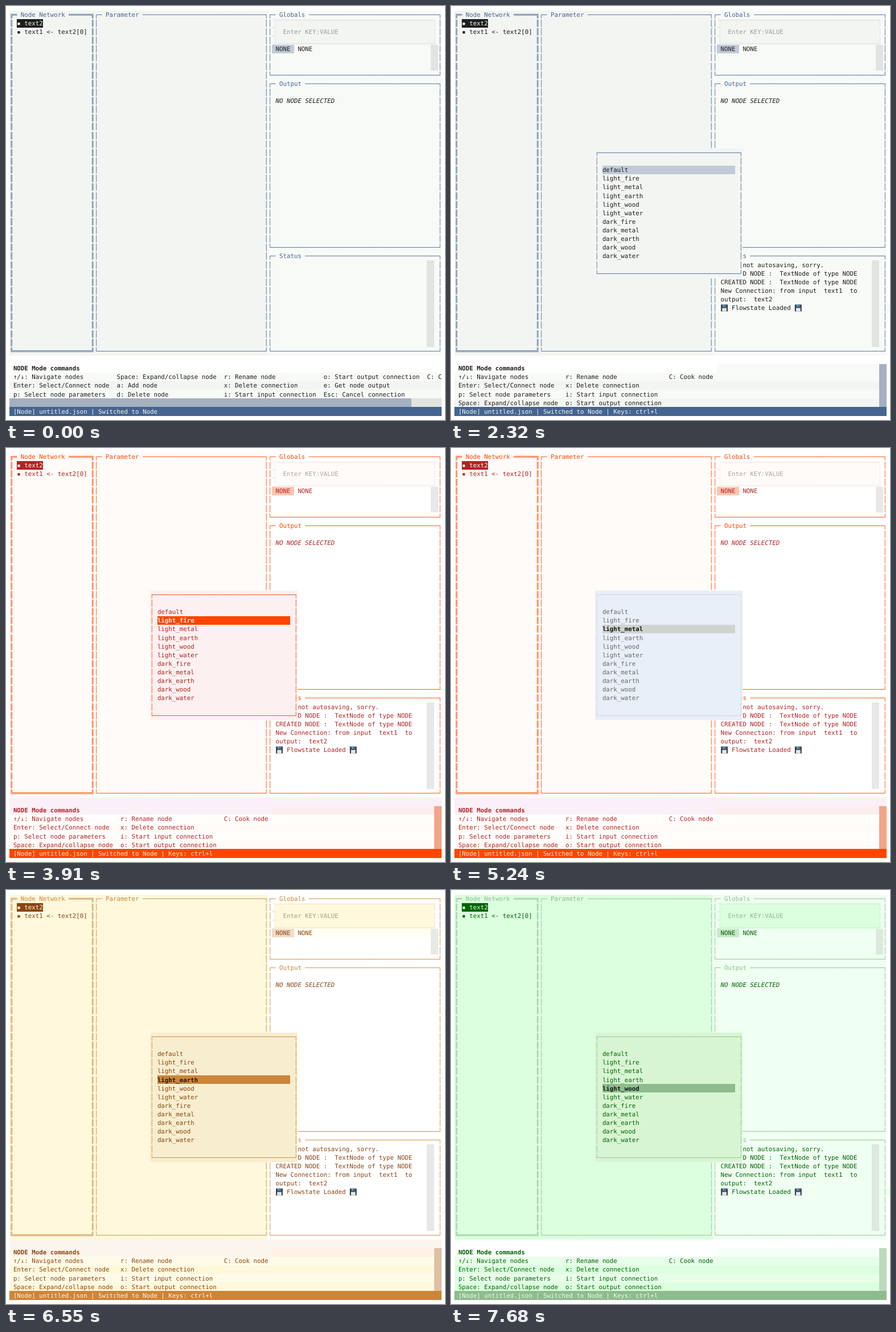
An HTML page with a canvas for the animation above (8000 ms loop, 771x726 px).

```html
<!DOCTYPE html>
<html lang="en">
<head>
<meta charset="utf-8">
<title>Terminal theme picker</title>
<style>
  html, body { margin: 0; width: 100%; height: 100%; overflow: hidden; background: #fff; }
  canvas { display: block; }
</style>
</head>
<body>
<canvas id="screen" width="771" height="726"></canvas>
<script>
const ctx = document.getElementById('screen').getContext('2d');
const LOOP = 8000;
const X0 = 6.4, Y0 = 7.5, CELL_W = 6.487, CELL_H = 15.13, BASELINE = 11.3;
const FONT = '10.776px "DejaVu Sans Mono", monospace';

// line: borders and titles, left/right: panel fills, odd/even: command table stripes
const THEMES = {
  default: { text: '#1e1e1e', line: '#456592', left: '#f3f5f2', right: '#f8faf7', edge: '#e6e8e5',
    hint: '#9a9c99', none: '#c1cad7', globalsRow: '#f8faf7', track: '#e2e4e1', thumb: '#a5b0c0',
    head: '#ffffff', headRight: '#f8faf7', even: '#f8faf7', odd: '#f3f5f2', bar: '#45648f', barText: '#f1f4f7',
    popup: '#f3f5f2', pick: '#45648f', pickText: '#f3f5f2' },
  light_fire: { text: '#b22222', line: '#ff4500', left: '#fffbf8', right: '#ffffff', edge: '#f4efec',
    hint: '#a9a5a2', none: '#ffc5b3', globalsRow: '#ffffff', track: '#e7e9e6', thumb: '#f2a588',
    head: '#fbf0f8', headRight: '#fceeec', even: '#fffefd', odd: '#fffbf8', bar: '#ff4500', barText: '#ffece4',
    popup: '#fcf0f0', pick: '#ff4500', pickText: '#fdeae4' },
  light_metal: { text: '#696969', line: '#d3d3d3', left: '#f0f8ff', right: '#ffffff', edge: '#e2eaf3',
    hint: '#9aa2aa', none: '#f4f6f4', globalsRow: '#ffffff', track: '#e7e9e6', thumb: '#dcdedb',
    head: '#dfffff', headRight: '#e2fefe', even: '#f6fbff', odd: '#f0f8ff', bar: '#d0d2cf', barText: '#ffffff',
    popup: '#e8eff9', pick: '#d0d3d0', pickText: '#151515' },
  light_earth: { text: '#8b4513', line: '#cd853a', left: '#fff8dc', right: '#ffffff', edge: '#f5edcf',
    hint: '#a8a085', none: '#f0dcc5', globalsRow: '#fffef4', track: '#e7e9e6', thumb: '#dec0a5',
    head: '#fcf5ee', headRight: '#fef2e6', even: '#fffbe8', odd: '#fff8dc', bar: '#cd853a', barText: '#fff4e4',
    popup: '#f7eecf', pick: '#cd853a', pickText: '#1e1e1e' },
  light_wood: { text: '#006400', line: '#8fbc8f', left: '#dcffe0', right: '#effff1', edge: '#d2f4d5',
    hint: '#8eb492', none: '#c9e9cb', globalsRow: '#effff1', track: '#dce9dc', thumb: '#bddabd',
    head: '#ffffff', headRight: '#f5fff6', even: '#e7fee9', odd: '#dcffe0', bar: '#8fbc8f', barText: '#eafbea',
    popup: '#d8f5d3', pick: '#8fbc8f', pickText: '#101810' },
};
const THEME_NAMES = ['default', ...['light', 'dark'].flatMap(shade =>
  ['fire', 'metal', 'earth', 'wood', 'water'].map(element => `${shade}_${element}`))];

const STEPS = [
  { at: 0, main: 'default' },
  { at: 40, main: 'default', loaded: true },
  { at: 2320, main: 'default', loaded: true, picked: 'default', unfocused: true },
  { at: 2350, main: 'default', loaded: true, picked: 'default' },
  { at: 3830, main: 'default', loaded: true, picked: 'light_fire' },
  { at: 3910, main: 'light_fire', loaded: true, picked: 'light_fire' },
  { at: 5240, main: 'light_fire', loaded: true, picked: 'light_metal' },
  { at: 5290, main: 'light_metal', loaded: true, picked: 'light_metal' },
  { at: 6450, main: 'light_metal', loaded: true, picked: 'light_earth' },
  { at: 6500, main: 'light_earth', loaded: true, picked: 'light_earth' },
  { at: 7630, main: 'light_earth', loaded: true, picked: 'light_wood' },
  { at: 7680, main: 'light_wood', loaded: true, picked: 'light_wood' },
];

const WIDE_HELP = [
  [1, ['↑/↓: Navigate nodes', 'Enter: Select/Connect node', 'p: Select node parameters']],
  [29, ['Space: Expand/collapse node', 'a: Add node', 'd: Delete node']],
  [58, ['r: Rename node', 'x: Delete connection', 'i: Start input connection']],
  [85, ['o: Start output connection', 'e: Get node output', 'Esc: Cancel connection']],
  [113, ['C: C']],
];
const NARROW_HELP = [
  [1, ['↑/↓: Navigate nodes', 'Enter: Select/Connect node', 'p: Select node parameters', 'Space: Expand/collapse node']],
  [30, ['r: Rename node', 'x: Delete connection', 'i: Start input connection', 'o: Start output connection']],
  [58, ['C: Cook node']],
];
const STATUS = [
  'Still not autosaving, sorry.',
  'CREATED NODE :  TextNode of type NODE',
  'CREATED NODE :  TextNode of type NODE',
  'New Connection: from input  text1  to',
  'output:  text2',
  '   Flowstate Loaded',
];

const x = col => X0 + col * CELL_W;
const y = row => Y0 + row * CELL_H;

function fill(col, row, cols, rows, color) {
  ctx.fillStyle = color;
  const left = Math.round(x(col)), top = Math.round(y(row));
  ctx.fillRect(left, top, Math.round(x(col + cols)) - left, Math.round(y(row + rows)) - top);
}

function text(col, row, string, color, style = '') {
  ctx.font = `${style} ${FONT}`;
  ctx.fillStyle = color;
  [...string].forEach((char, i) => {
    if (char !== ' ') ctx.fillText(char, x(col + i), y(row) + BASELINE);
  });
}

function frame(col, row, cols, rows, color, title = '', glyphs = '┌─┐│└┘') {
  const [topLeft, dash, topRight, side, bottomLeft, bottomRight] = glyphs;
  const label = title && `${dash} ${title} `;
  text(col, row, topLeft + label.padEnd(cols - 2, dash) + topRight, color);
  for (let r = row + 1; r < row + rows - 1; r++) {
    text(col, r, side, color);
    text(col + cols - 1, r, side, color);
  }
  text(col, row + rows - 1, bottomLeft + dash.repeat(cols - 2) + bottomRight, color);
}

function floppy(col, row) {
  const parts = [['#37434b', 0, 0, 12, 12], ['#5f9fc4', 3, 0, 6, 4], ['#37434b', 6.5, 0.8, 1.5, 2.4], ['#e4e8ea', 2.2, 6, 7.6, 6]];
  for (const [color, dx, dy, w, h] of parts) {
    ctx.fillStyle = color;
    ctx.fillRect(x(col) + 0.6 + dx, y(row) + 1.6 + dy, w, h);
  }
}

function drawPanels(t) {
  fill(0, 0, 70, 40, t.left);
  fill(70, 0, 47, 40, t.right);
  frame(0, 0, 23, 40, t.line, 'Node Network', '╔═╗║╚╝');
  frame(23, 0, 47, 40, t.line, 'Parameter');
  frame(70, 0, 47, 8, t.line, 'Globals');
  frame(70, 8, 47, 20, t.line, 'Output');
  frame(70, 28, 47, 12, t.line, 'Status');

  fill(2, 1, 7, 1, t.text);
  text(2, 1, '▪ text2', t.left);
  text(2, 2, '▪ text1 <- text2[0]', t.text);

  drawInput(t);
  fill(71, 4, 43, 1, t.globalsRow);
  fill(71, 4, 6, 1, t.none);
  text(72, 4, 'NONE  NONE', t.text);
  fill(114, 4, 2, 3, t.track);
  text(72, 10, 'NO NODE SELECTED', t.text, 'italic');
  fill(113, 29, 2, 10, t.track);
}

function drawInput(t) {
  fill(71, 1, 1, 3, t.edge);
  fill(72, 1, 43, 3, t.left);
  for (let row = 1; row <= 3; row++) {
    text(71, row, '▊', t.right);
    text(115, row, '▎', t.edge);
  }
  text(72, 1, '▔'.repeat(43), t.edge);
  text(72, 3, '▁'.repeat(43), t.edge);
  text(74, 2, 'Enter KEY:VALUE', t.hint);
}

function drawStatus(t) {
  STATUS.forEach((line, i) => text(72, 29 + i, line, t.text));
  fill(117, 34, 1, 1, t.right);
  floppy(72, 34);
  floppy(92, 34);
}

function drawCommands(t, loaded) {
  fill(0, 40, 117, 2, t.head);
  for (let row = 42; row < 46; row++) fill(0, row, 117, 1, row % 2 ? t.odd : t.even);
  if (loaded) {
    fill(71, 41, 44, 1, t.headRight);
    fill(115, 41, 2, 5, t.thumb);
  } else {
    fill(0, 45, 117, 1, t.track);
    fill(0, 45, 108.8, 1, t.thumb);
  }
  text(1, 41, 'NODE Mode commands', t.text, 'bold');
  for (const [col, lines] of loaded ? NARROW_HELP : WIDE_HELP)
    lines.forEach((line, i) => text(col, 42 + i, line, t.text));
}

function drawPopup(picked, unfocused) {
  const t = THEMES[picked];
  fill(38, 16, 40, 15, t.popup);
  frame(38, 16, 40, 15, t.line);
  THEME_NAMES.forEach((name, i) => {
    const active = name === picked;
    if (active) fill(40, 18 + i, 36, 1, unfocused ? t.none : t.pick);
    const strong = active && !unfocused;
    text(40, 18 + i, name, strong ? t.pickText : t.text, strong ? 'bold' : '');
  });
}

function draw({ main, loaded, picked, unfocused }) {
  const t = THEMES[main];
  ctx.fillStyle = '#fff';
  ctx.fillRect(0, 0, 771, 726);
  drawPanels(t);
  if (loaded) drawStatus(t);
  drawCommands(t, loaded);
  fill(0, 46, 117, 1, t.bar);
  text(1, 46, '[Node] untitled.json | Switched to Node' + (picked ? ' | Keys: ctrl+l' : ''), t.barText);
  if (picked) drawPopup(picked, unfocused);
}

ctx.textRendering = 'geometricPrecision';
const start = performance.now();
let shown;
function tick() {
  const time = (performance.now() - start) % LOOP;
  const step = STEPS.findLast(s => s.at <= time);
  if (step !== shown) draw(shown = step);
  requestAnimationFrame(tick);
}
tick();
</script>
</body>
</html>
```
